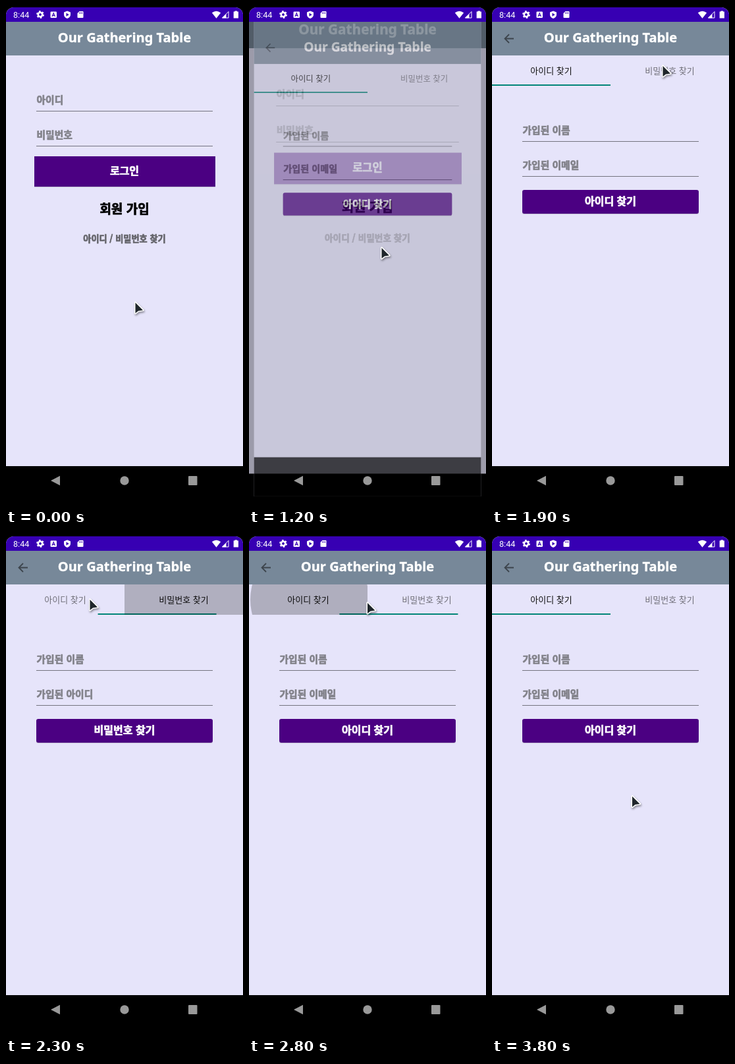
Write an HTML page that moves like this. It is 360 px wide and 760 px high and loops after 4100 ms.

```html
<!DOCTYPE html>
<html lang="ko">
<head>
<meta charset="utf-8">
<title>Login</title>
<style>
html, body { margin: 0; height: 100%; overflow: hidden; background: #000; }
svg { display: block; width: 360px; height: 760px; }
text { font-family: "Noto Sans CJK KR", "Noto Sans CJK", "Noto Sans", sans-serif; }
.heavy { font-weight: 900; stroke-width: .7px; stroke-linejoin: round; }
.title { font: 800 20px "Noto Sans", "Open Sans", sans-serif; fill: #fff; stroke: #fff; stroke-width: .4px; }
.clock { font: 12.6px Roboto, sans-serif; fill: #fff; }
.button { fill: #4b0082; filter: drop-shadow(0 1px .7px rgba(0,0,0,.18)); }
#cursor { filter: drop-shadow(1px 2px 1.5px rgba(0,0,0,.4)); }
</style>
</head>
<body>
<svg viewBox="0 0 360 760">
  <defs>
    <clipPath id="screen"><path d="M0 760V14A12 12 0 0 1 12 2H348A12 12 0 0 1 360 14V760Z"/></clipPath>
    <clipPath id="tabLeft"><rect y="75" width="180" height="46"/></clipPath>
    <clipPath id="tabRight"><rect x="180" y="75" width="180" height="46"/></clipPath>
  </defs>
  <rect width="360" height="760"/>
  <g clip-path="url(#screen)">
    <g id="login"></g>
    <g id="finder"></g>
    <rect width="360" height="24" fill="#3700b3"/>
  </g>
  <g fill="#fff">
    <text class="clock" x="11" y="17.5">8:44</text>
    <g transform="translate(52 13)" fill="none" stroke="#fff">
      <circle r="3.2" stroke-width="2.6"/>
      <circle r="4.9" stroke-width="2" stroke-dasharray="2.5 2.63"/>
    </g>
    <rect x="67.5" y="8.5" width="9.5" height="9.5" rx="1.3"/>
    <path d="M70 16L72.25 10.6L74.5 16M70.8 14.4H73.7" fill="none" stroke="#3700b3" stroke-width="1.1"/>
    <path d="M93 7.5L98 9.5V13Q98 17 93 19Q88 17 88 13V9.5Z"/>
    <path d="M91.5 10.6L95.7 13.2L91.5 15.8Z" fill="#3700b3"/>
    <path d="M111.5 8H116.5Q117.5 8 117.5 9V17Q117.5 18 116.5 18H109.5Q108.5 18 108.5 17V11Z"/>
    <path d="M111.5 9.5V11.7M113.5 9.5V11.7M115.5 9.5V11.7" stroke="#3700b3"/>
    <path d="M312.8 10.2Q319.5 5.2 326.2 10.2L319.5 18.8Z"/>
    <path d="M338 8.5V18H328.5Z" fill="none" stroke="#fff"/>
    <path d="M334.5 12V18.3H328Z"/>
    <path d="M347.5 7.5H351V8.6H353V18.5H345.7V8.6H347.5Z"/>
  </g>
  <g fill="#999">
    <path d="M68 720L82 712.7V727.3Z"/>
    <circle cx="180" cy="720" r="6.7"/>
    <rect x="277" y="713" width="13.5" height="14" rx="1"/>
  </g>
  <path id="cursor" d="M0 0V16L4.5 12.4L11.5 11.5Z" fill="#1f262b" stroke="#fff" stroke-width="3.2" stroke-linejoin="round" paint-order="stroke"/>
</svg>
<script>
const LOOP = 4100, STEP = 100;
const $ = id => document.getElementById(id);

const rect = (x, y, w, h, fill, extra = '') =>
  `<rect x="${x}" y="${y}" width="${w}" height="${h}" fill="${fill}" ${extra}/>`;
// Text placed by the middle of its glyphs.
const label = (s, x, mid, size, fill, extra = '') =>
  `<text x="${x}" y="${mid + size * .36}" font-size="${size}" fill="${fill}" ${extra}>${s}</text>`;
const heavy = (s, x, mid, size, fill, extra = 'text-anchor="middle"') =>
  label(s, x, mid, size, fill, `class="heavy" stroke="${fill}" ${extra}`);
const field = (s, line, id = '') =>
  heavy(s, 46.5, line - 16.5, 14.8, '#82828a', `id="${id}"`) + rect(46, line, 268, 1, '#74747f');
const page = body =>
  rect(0, 0, 360, 760, '#e6e4fa') + rect(0, 0, 360, 75, '#778899') +
  '<text class="title" x="180" y="55" text-anchor="middle">Our Gathering Table</text>' +
  body + rect(0, 698, 360, 62, '#000');

$('login').innerHTML = page(
  field('아이디', 159) + field('비밀번호', 212) +
  rect(43, 228, 275, 46, '#4b0082', 'class="button"') +
  heavy('로그인', 180, 250, 16, '#fff') +
  heavy('회원 가입', 180, 308, 19, '#000') +
  heavy('아이디 / 비밀번호 찾기', 180, 353.5, 13.2, '#66666c')
) + rect(0, 0, 360, 760, '#000', 'id="dim"');

$('finder').innerHTML = page(
  '<path d="M33 49.5H20M26 43L19.5 49.5L26 56" fill="none" stroke="#3d454d" stroke-width="1.8"/>' +
  label('아이디 찾기', 90, 98.5, 13, '#111', 'id="tab0" text-anchor="middle"') +
  label('비밀번호 찾기', 270, 98.5, 13, '#111', 'id="tab1" text-anchor="middle"') +
  rect(0, 119, 180, 2, '#018577', 'id="bar"') +
  '<g clip-path="url(#tabLeft)"><circle id="ripple0" cy="98"/></g>' +
  '<g clip-path="url(#tabRight)"><circle id="ripple1" cy="98"/></g>' +
  field('가입된 이름', 205) + field('', 258, 'second') +
  rect(46, 279, 268, 36, '#4b0082', 'class="button" rx="3"') +
  heavy('', 180, 296.5, 16, '#fff', 'text-anchor="middle" id="action"')
);

const clamp = v => Math.min(1, Math.max(0, v));
const part = (t, start, length) => clamp((t - start) / length);
const smooth = u => u * u * (3 - 2 * u);
const cubic = (a, b, c, d, u) => {
  const v = 1 - u;
  return v * v * v * a + 3 * v * v * u * b + 3 * v * u * u * c + u * u * u * d;
};
// Fast out, slow in
function standard(x) {
  let lo = 0, hi = 1;
  for (let i = 0; i < 20; i++) {
    const mid = (lo + hi) / 2;
    if (cubic(0, .4, .2, 1, mid) < x) lo = mid; else hi = mid;
  }
  return cubic(0, 0, 1, 1, lo);
}
const settle = u => 1 - (1 - u) ** 4.4;

const OPEN = 1100, PRESS = [2630, 2055], SELECT = 95;
const MOVES = [
  { at: 100, time: 600, x: 204, y: 363 },
  { at: 700, time: 300, x: 201.5, y: 367 },
  { at: 1300, time: 600, x: 259.5, y: 91 },
  { at: 2100, time: 200, x: 127.5, y: 98 },
  { at: 2700, time: 100, x: 180, y: 103 },
  { at: 3200, time: 500, x: 213, y: 396.5 }
];

const set = (id, attrs) => {
  for (const k in attrs) $(id).setAttribute(k, attrs[k]);
};
const zoom = s => `translate(180 380) scale(${s}) translate(-180 -380)`;

function pointer(t) {
  let x = 196.5, y = 450;
  for (const m of MOVES) {
    const u = smooth(part(t, m.at, m.time));
    x += (m.x - x) * u;
    y += (m.y - y) * u;
  }
  set('cursor', { transform: `translate(${x} ${y})` });
}

function ripple(i, t, from) {
  const age = t - PRESS[i], grow = smooth(part(age, 0, 200));
  set('ripple' + i, {
    cx: from + (90 + 180 * i - from) * grow,
    r: 96 * grow,
    opacity: .24 * clamp((460 - age) / 220)
  });
}

function draw(t) {
  const open = settle(part(t, OPEN, 400)), done = open > .995;
  set('login', { transform: zoom(1 + .05 * open), visibility: done ? 'hidden' : 'visible' });
  set('dim', { opacity: .45 * open });
  set('finder', {
    transform: done ? '' : zoom(.85 + .15 * open),
    opacity: part(t, OPEN + 50, 83)
  });

  const [back, forth] = PRESS.map(p => p + SELECT);
  const second = t >= forth && t < back;
  set('tab0', { 'fill-opacity': second ? .55 : 1 });
  set('tab1', { 'fill-opacity': second ? 1 : .55 });
  $('second').textContent = second ? '가입된 아이디' : '가입된 이메일';
  $('action').textContent = second ? '비밀번호 찾기' : '아이디 찾기';
  set('bar', { x: 180 * (standard(part(t, forth, 300)) - standard(part(t, back, 300))) });

  ripple(0, t, 126);
  ripple(1, t, 259);
  pointer(t);
}

const start = performance.now();
function tick() {
  const t = (performance.now() - start) % LOOP;
  draw(Math.floor(t / STEP) * STEP);
  requestAnimationFrame(tick);
}
tick();
</script>
</body>
</html>
```
